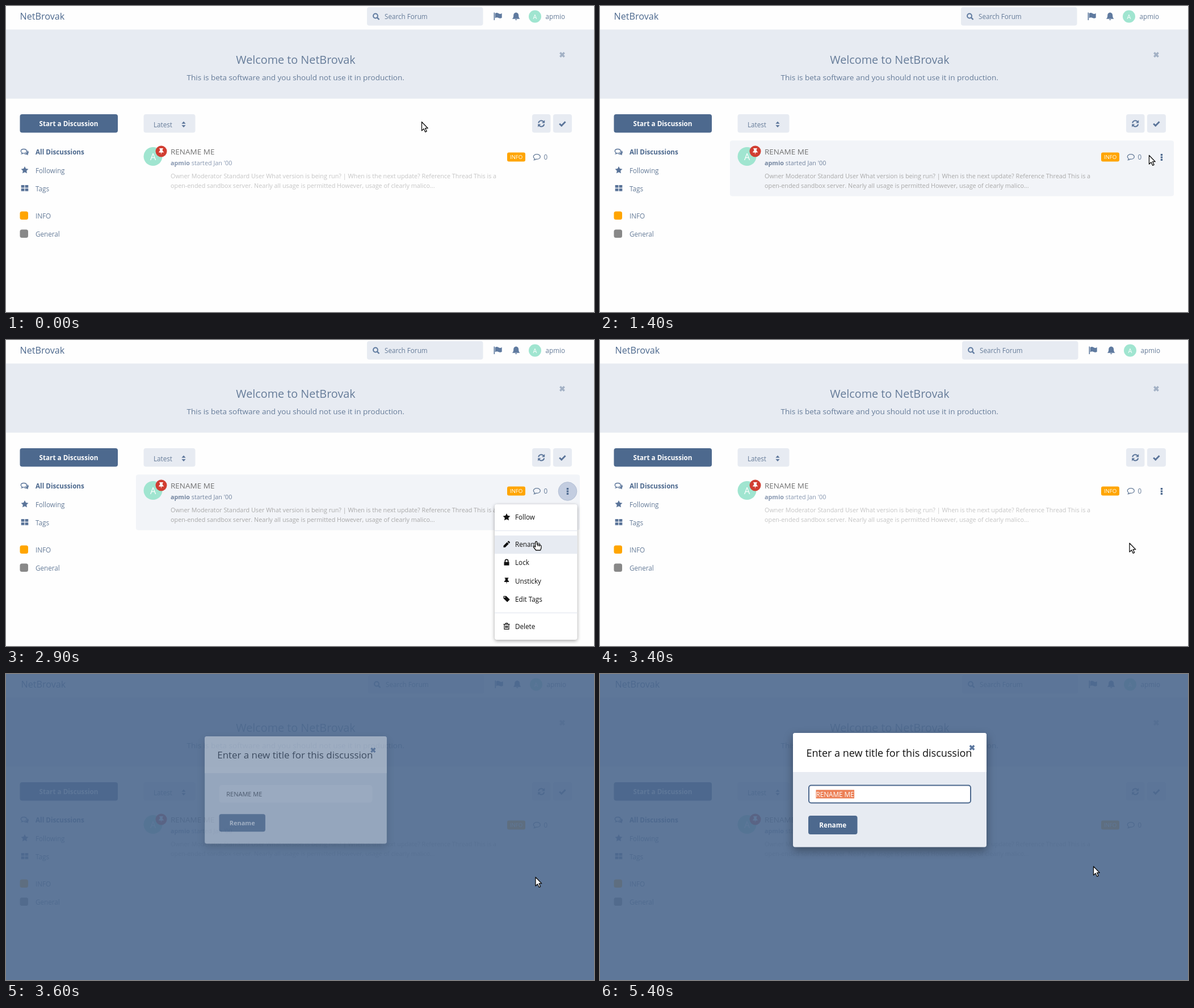
An HTML page that plays this animation: 1036 px wide and 540 px high, repeating every 5.5 s.

```html
<!DOCTYPE html>
<html lang="en">
<head>
<meta charset="utf-8">
<title>Rename a discussion</title>
<style>
html, body { margin: 0; width: 100%; height: 100%; overflow: hidden; background: #fefefe; }
svg { display: block; width: 100vw; height: 100vh; }
text { font: 11.7px "Open Sans", "Noto Sans", sans-serif; fill: #667c99; white-space: pre; }
.mid { text-anchor: middle; }
.b { font-weight: 700; }
.blue { fill: #4d698e; }
.white { fill: #fff; }
.soft { fill: #e7ebf2; }
.line { fill: none; stroke: currentColor; }
.small, .small tspan { font-size: 10.8px; }
.t15 { font-size: 13.5px; }
use { fill: currentColor; }
#list { --info: #8797b0; --body: #c5c5c5; }
#list.hover { --info: #72849f; --body: #a8a8a8; }
#info { fill: var(--info); }
.body { fill: var(--body); }
#menu text { fill: #111; }
#menu .box { filter: drop-shadow(0 2px 3px rgba(0,0,0,.35)); }
#modal .box { filter: drop-shadow(0 6px 8px rgba(0,0,0,.35)); }
</style>
</head>
<body>
<svg viewBox="0 0 1036 540">
<defs>
  <path id="flag" d="M-7-6.5h1.6V7H-7zM-4.8-5q3-2 6 0t6-.3v8q-3 2-6 .3t-6 .5z"/>
  <path id="bell" d="M0-7c3.6.6 4.5 3 4.5 5.5 0 3 1 4.500 2.400 5.700H-6.900C-5.500 3-4.500 1.500-4.500-1.500-4.500-4-3.600-6.400 0-7zM-1.700 4.900h3.400a1.700 1.700 0 0 1-3.400 0z"/>
  <path id="times" class="line" stroke-width="3.4" d="M-3.700-3.700l7.400 7.400M3.700-3.700l-7.400 7.400"/>
  <path id="star" d="M0-6.500l2 4.100 4.500.6-3.300 3.100.8 4.500-4-2.100-4 2.100.8-4.500-3.300-3.100 4.500-.6z"/>
  <path id="grid" d="M-6.300-5.500h5.700v4.800h-5.700zM.6-5.500h5.700v4.800H.6zM-6.300.5h5.700v4.800h-5.700zM.6.5h5.700v4.800H.6z"/>
  <path id="sort" d="M-3.600-1.200L0-5.200l3.600 4zM-3.600 1.200L0 5.200l3.600-4z"/>
  <path id="check" class="line" stroke-width="2.800" d="M-5.300.2l3.600 3.500 6.800-7"/>
  <path id="pin" d="M-3.300-5.500h6.600v1.300H2.300v3.400q2 .9 2 2.700H.6L0 6l-.6-4.100h-3.700q0-1.800 2-2.700v-3.400h-1z"/>
  <path id="dots" d="M-1.700-6h3.400v3.200h-3.400zM-1.700-1.600h3.400v3.200h-3.400zM-1.700 2.800h3.400V6h-3.400z"/>
  <path id="pencil" d="M-5.500 5.500v-3l6.300-6.300 3 3-6.300 6.300zM1.600-4.600l1-1q.8-.6 1.600 0l1.400 1.400q.6.8 0 1.600l-1 1z"/>
  <path id="lock" fill-rule="evenodd" d="M-4.500-.8h1V-2.500a3.500 3.500 0 0 1 7 0v1.700h1v6h-9zM-1.800-.8h3.600v-1.700a1.800 1.800 0 0 0-3.600 0z"/>
  <path id="tag" fill-rule="evenodd" d="M-5.500-5.300h4.800L5.700 1 1.200 5.500-5.500-1zM-3.400-4.300a1 1 0 1 0 .1 0z"/>
  <path id="trash" class="line" stroke-width="1.200" d="M-5.500-3.400h11M-2-3.600l.6-1.800h2.800l.6 1.800M-4-3.200v8.500h8v-8.500M-1.700-1v4.300M0-1v4.300M1.700-1v4.300"/>
  <path id="bubble" class="line" stroke-width="1.300" d="M0-4.800c3.600 0 6 2 6 4.300S3.600 3.800 0 3.800l-1.300-.1q-1.700 1.500-3.600 1.500 1-1 1.200-2.200C-5.200 2.200-6 .9-6-.5c0-2.300 2.400-4.300 6-4.300z"/>
  <g id="comments">
    <path class="line" stroke-width="1.300" d="M-1.700-5c3 0 5 1.600 5 3.700s-2 3.700-5 3.700l-1.100-.1q-1.200 1-2.700 1.100.8-.8.9-1.800C-6.200.9-6.700-.2-6.700-1.300c0-2.100 2-3.700 5-3.700z"/>
    <path d="M4.600-2.800C6.300-2 7 .0 6.800 1.300 6.700 2.400 6 3.200 5.300 3.700q.2 1 1.200 1.900-2 0-3.200-1.200C1.500 4.700-.3 4.500-1.400 3.600 2.500 3.600 5 1 4.600-2.800z"/>
  </g>
  <g id="refresh">
    <path class="line" stroke-width="1.900" d="M-5-1a5 5 0 0 1 9-2.200M5 1a5 5 0 0 1-9 2.200"/>
    <path d="M6-6.200V-1H.8zM-6 6.200V1h5.200z"/>
  </g>
</defs>

<rect width="1036" height="540" fill="#fefefe"/>
<rect class="soft" y="41.500" width="1036" height="122"/>

<g id="top" color="#5f7a9f">
  <text class="blue" x="24.500" y="24" style="font-size:16.200px">NetBrovak</text>
  <rect class="soft" x="636" y="2" width="204.500" height="32.500" rx="4"/>
  <circle class="line" cx="651" cy="17.500" r="3.900" stroke-width="2"/>
  <path class="line" stroke-width="2.400" d="M654 20.500l3.500 3.500"/>
  <text x="667" y="23">Search Forum</text>
  <use href="#flag" x="866.500" y="18"/>
  <use href="#bell" x="898.700" y="18.500"/>
  <circle cx="932" cy="18.500" r="11" fill="#a0e5d0"/>
  <text class="mid white" x="932" y="22.500" style="font-size:10.800px">A</text>
  <text x="950.500" y="23">apmio</text>
</g>

<text class="mid" x="510.500" y="102" style="font-size:19.800px">Welcome to NetBrovak</text>
<text class="mid t15" x="510.200" y="131">This is beta software and you should not use it in production.</text>
<use href="#times" x="980" y="86" color="#a3b1c5"/>

<g color="#5a7499">
  <rect class="blue" x="24.500" y="191" width="172.500" height="32.500" rx="4"/>
  <text class="b mid white" x="110.500" y="212">Start a Discussion</text>
  <use href="#comments" x="33" y="257.500"/>
  <text class="b blue" x="52" y="262">All Discussions</text>
  <use href="#star" x="33" y="289.500"/>
  <text x="52" y="294.500">Following</text>
  <use href="#grid" x="33" y="321.500"/>
  <text x="52" y="326.500">Tags</text>
  <rect x="24.500" y="362.500" width="14.500" height="14.500" rx="3.500" fill="#ffa500"/>
  <text x="52" y="374.500">INFO</text>
  <rect x="24.500" y="394.500" width="14.500" height="14.500" rx="3.500" fill="#888"/>
  <text x="52" y="406.500">General</text>

  <rect class="soft" x="242.500" y="191" width="91" height="32.500" rx="4"/>
  <text x="260" y="213.500">Latest</text>
  <use href="#sort" x="313" y="209"/>
  <rect class="soft" x="927" y="191" width="32.500" height="32.500" rx="4"/>
  <use href="#refresh" x="943.200" y="207.500"/>
  <rect class="soft" x="964" y="191" width="33" height="32.500" rx="4"/>
  <use href="#check" x="980.500" y="207.500"/>
</g>

<g id="list" color="#667c99">
  <rect id="shade" x="229" y="237.500" width="782" height="98" rx="4" fill="#f2f4f8"/>
  <circle cx="259" cy="265.500" r="16.500" fill="#a0e5d0"/>
  <text class="mid white" x="259" y="271.500" style="font-size:16.200px">A</text>
  <circle cx="273.500" cy="256.500" r="10" fill="#d13e32"/>
  <use href="#pin" x="273.500" y="256.500" color="#fff"/>
  <text class="t15" x="290" y="262" style="fill:#707070">RENAME ME</text>
  <text id="info" class="small" x="290" y="280.500"><tspan class="b">apmio</tspan> started Jan '00</text>
  <text class="small body" x="290" y="304.300">Owner Moderator Standard User What version is being run? | When is the next update? Reference Thread This is a</text>
  <text class="small body" x="290" y="320.800">open-ended sandbox server. Nearly all usage is permitted However, usage of clearly malico...</text>
  <rect x="883" y="258.500" width="32" height="16" rx="3" fill="#ffa500"/>
  <text class="mid white" x="899" y="270" style="font-size:9.700px">INFO</text>
  <use href="#bubble" x="935.300" y="266.500"/>
  <text x="947.500" y="270.700">0</text>
  <circle id="knob" cx="989.500" cy="267" r="16.300"/>
  <use id="more" href="#dots" x="989.500" y="267" color="#4d698e"/>
</g>

<g id="menu" color="#111">
  <rect class="box" x="861" y="290" width="145.500" height="239" rx="4" fill="#fff"/>
  <rect id="row" class="soft" x="861" width="145.500" height="32.300"/>
  <path d="M861 336.500h145.500M861 481.500h145.500" stroke="#e7ebf2" stroke-width="1.500"/>
</g>

<rect id="veil" width="1036" height="540" fill="#4d698e"/>

<g id="modal">
  <rect class="box soft" x="340" y="104" width="341" height="201.500" rx="4"/>
  <path d="M340 173v-65q0-4 4-4h333q4 0 4 4v65z" fill="#fff"/>
  <text x="363.500" y="145.500" style="font-size:18px;fill:#111">Enter a new title for this discussion</text>
  <use href="#times" x="655.500" y="130" color="#5a769e"/>
  <rect id="field" x="368" y="196.500" width="285" height="31" rx="4" stroke-width="2"/>
  <rect id="mark" x="380.500" y="204.500" width="67.500" height="15" fill="#ec7f55"/>
  <text id="value" x="380.500" y="216.500">RENAME ME</text>
  <rect class="blue" x="367" y="250" width="86.500" height="33" rx="4"/>
  <text class="b mid white" x="410.200" y="271">Rename</text>
</g>

<g id="cursor" stroke="#111" stroke-width="1.300" stroke-linejoin="round" fill="#fff">
  <path id="arrow" d="M.5.5v15.500l3.600-3.300 2.600 5.600 2.500-1.100-2.500-5.500h4.600z"/>
  <path id="hand" d="M-1.300 2a1.500 1.500 0 0 1 3 0v3.800l5.500 1q1.800.5 1.800 2.200V12l-1.400 4H-.3l-4.200-5.500q-.8-1.800 1-1.900l2.200 1.700zM3 9v-2M5.700 9.500V7"/>
</g>
</svg>

<script>
const $ = id => document.getElementById(id);
const set = (id, attrs) => { for (const k in attrs) $(id).setAttribute(k, attrs[k]); };
const show = (id, on) => set(id, { visibility: on ? "visible" : "hidden" });
const ease = (t, start, power) =>
  1 - (1 - Math.min(1, Math.max(0, (t - start) / 200))) ** power;

const items = [
  ["star", "Follow", 313], ["pencil", "Rename", 361], ["lock", "Lock", 393],
  ["pin", "Unsticky", 425.5], ["tag", "Edit Tags", 457.5], ["trash", "Delete", 505.5]
];
$("menu").insertAdjacentHTML("beforeend", items.map(([icon, label, y]) =>
  `<use href="#${icon}" x="882" y="${y - .5}"/><text x="897" y="${y + 4.3}">${label}</text>`).join(""));

// time, x, y of the pointer
const path = [
  [0, 732, 204], [600, 732, 204], [1400, 967, 263], [1700, 988, 266], [2100, 988, 266],
  [2700, 934, 355], [3200, 934, 355], [3300, 932.5, 358], [4300, 932.5, 358],
  [4800, 902, 338], [5300, 869, 339], [5500, 869, 339]
];

function pointer(t) {
  const i = path.findIndex(p => p[0] > t);
  const [t0, x0, y0] = path[i - 1], [t1, x1, y1] = path[i];
  const p = (t - t0) / (t1 - t0);
  return [x0 + (x1 - x0) * p, y0 + (y1 - y0) * p];
}

function draw(t) {
  const [x, y] = pointer(t);
  const picked = t >= 3300, open = t >= 2000 && !picked;
  const hover = y > 237 && !picked, onKnob = hover && x >= 973;
  const focused = t >= 3800;

  set("cursor", { transform: `translate(${x} ${y})` });
  show("hand", onKnob || open);
  show("arrow", !(onKnob || open));

  set("list", { class: hover ? "hover" : "" });
  show("shade", hover);
  show("knob", onKnob || open);
  set("knob", { fill: open ? "#c3cde0" : "#dde3ee", stroke: open ? "#b3bfd4" : "none" });
  set("more", { opacity: picked ? 1 - ease(t, 3400, 1) : +hover });

  const row = items.find(r => Math.abs(y - r[2]) < 16);
  show("menu", open);
  show("row", open && row);
  if (row) set("row", { y: row[2] - 16 });

  set("top", { transform: `translate(${t >= 3400 ? 2 : 0} 0)` });
  set("veil", { opacity: .9 * ease(t, 3400, 2.4) });

  const p = ease(t, 3550, 1.8);
  set("modal", {
    opacity: p,
    transform: `translate(510.5 204.7) scale(${.9 + .1 * p}) translate(-510.5 -204.7)`
  });
  set("field", { fill: focused ? "#fff" : "#f3f5fa", stroke: focused ? "#4d698e" : "#f3f5fa" });
  set("mark", { opacity: +focused });
  set("value", { style: `fill:${focused ? "#fff" : "#333"}` });
}

const start = performance.now();
function tick(now) {
  const t = Math.max(0, now - start) % 5500;
  draw(Math.floor(t / 100) * 100);
  requestAnimationFrame(tick);
}
draw(0);
requestAnimationFrame(tick);
</script>
</body>
</html>
```
